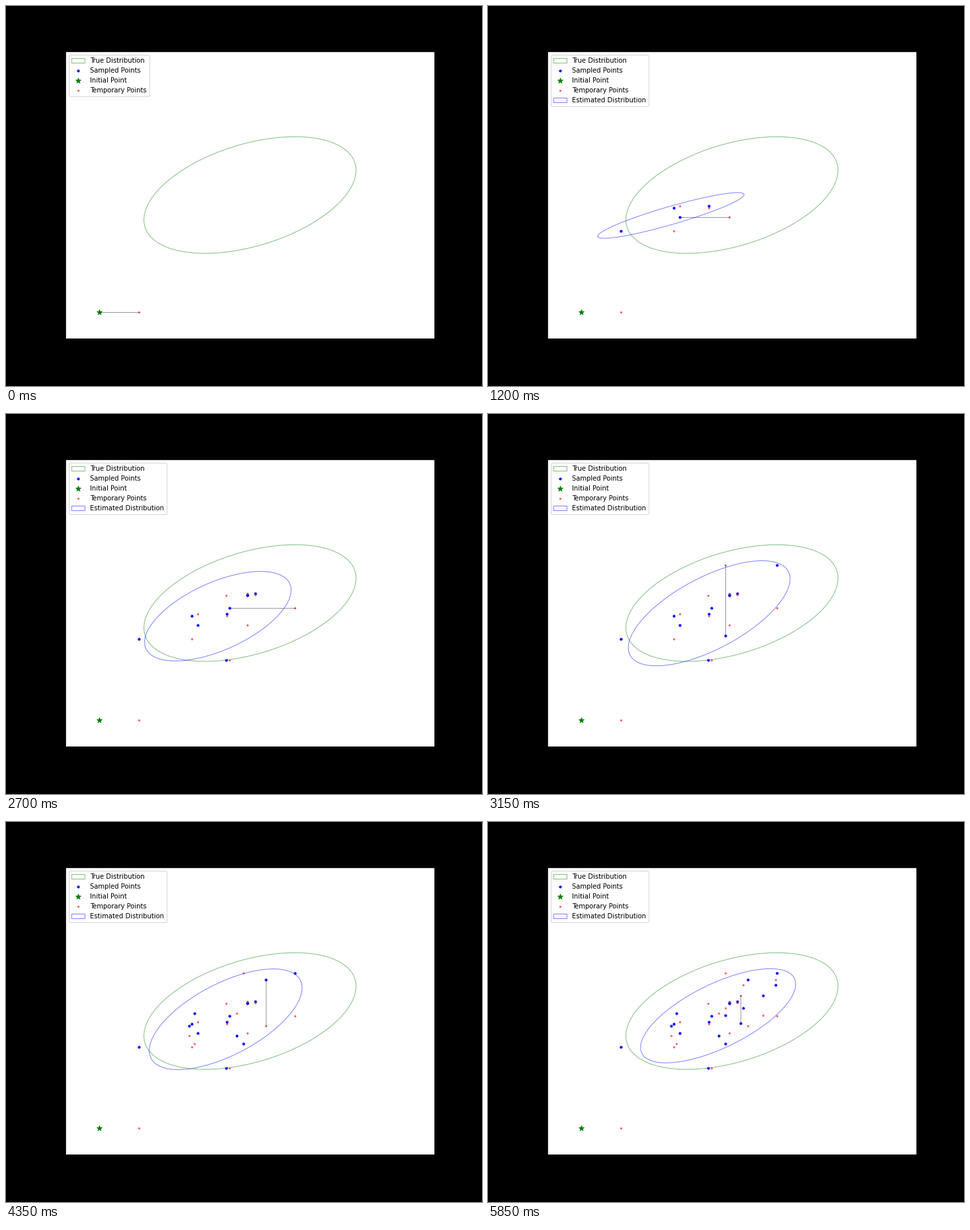
Recreate the animation shown at these times as a matplotlib script. Size 720 px wide and 576 px high, loop 6000 ms.

```python
import numpy as np
import matplotlib.pyplot as plt
from matplotlib.animation import FuncAnimation
from matplotlib.patches import Ellipse

FRAMES, INTERVAL = 40, 150
LIMIT = 11
CENTER = np.array([369, 286.56])              # stage position of the origin, px
SCALE = np.array([558, -434.88]) / (2 * LIMIT)  # px per data unit
START = np.array([-9.0, -9.0])

# Key points: where the Gibbs chain lands, in stage pixels.
# Everything else (half steps, links, fitted ellipse) follows from them.
CHAIN_X = [201, 281, 334, 290, 365, 377, 365, 333, 338, 437,
           359, 285, 349, 277, 393, 435, 386, 359, 416, 382]
CHAIN_Y = [341, 306, 303, 320, 274, 272, 275, 373, 294, 229,
           336, 290, 324, 309, 239, 247, 282, 293, 263, 305]
samples = (np.column_stack([CHAIN_X, CHAIN_Y]) - CENTER) / SCALE
path = np.vstack([START, samples])
temps = np.column_stack([path[1:, 0], path[:-1, 1]])  # new x, previous y


def fit_ellipse(patch, mean, cov, sigmas=2):
    """Shape the patch as the sigma contour of a normal distribution."""
    values, vectors = np.linalg.eigh(cov)
    minor, major = 2 * sigmas * np.sqrt(np.clip(values, 0, None))
    patch.set_center(mean)
    patch.set_width(major)
    patch.set_height(minor)
    patch.set_angle(np.degrees(np.arctan2(vectors[1, 1], vectors[0, 1])))


def add_ellipse(color, label):
    patch = Ellipse((0, 0), 1, 1, facecolor="none", edgecolor=color,
                    alpha=0.5, lw=1, label=label)
    return ax.add_patch(patch)


plt.rcParams["font.family"] = "DejaVu Sans"
fig = plt.figure(figsize=(10, 8), dpi=72, facecolor="black")
ax = fig.add_axes([0.125, 0.125, 0.775, 0.755])
ax.set(xlim=(-LIMIT, LIMIT), ylim=(-LIMIT, LIMIT), xticks=[], yticks=[])

true_dist = add_ellipse("green", "True Distribution")
fit_ellipse(true_dist, (0, 0), [[10, 3], [3, 5]])
sampled = ax.scatter([], [], s=10, c="blue", label="Sampled Points")
initial = ax.scatter(*START, s=65, c="green", marker="*", label="Initial Point")
temporary = ax.scatter([], [], s=5, c="red", alpha=0.5, label="Temporary Points")
estimate = add_ellipse("blue", "Estimated Distribution")
step, = ax.plot([], [], color="black", alpha=0.4, lw=1)


def update(frame):
    n_temps = frame // 2 + 1
    n_samples = (frame + 1) // 2
    temporary.set_offsets(temps[:n_temps])
    sampled.set_offsets(samples[:n_samples])

    # Even frames move along x, odd frames along y
    step.set_data(*np.transpose([path[n_samples], temps[n_temps - 1]]))

    handles = [true_dist, sampled, initial, temporary]
    has_estimate = n_samples > 1
    estimate.set_visible(has_estimate)
    if has_estimate:
        seen = samples[:n_samples]
        fit_ellipse(estimate, seen.mean(axis=0), np.cov(seen.T))
        handles.append(estimate)
    ax.legend(handles=handles, loc="upper left", fontsize=10)
    return []


anim = FuncAnimation(fig, update, frames=FRAMES, interval=INTERVAL,
                     repeat=True, repeat_delay=0, blit=False)
plt.show()
```
